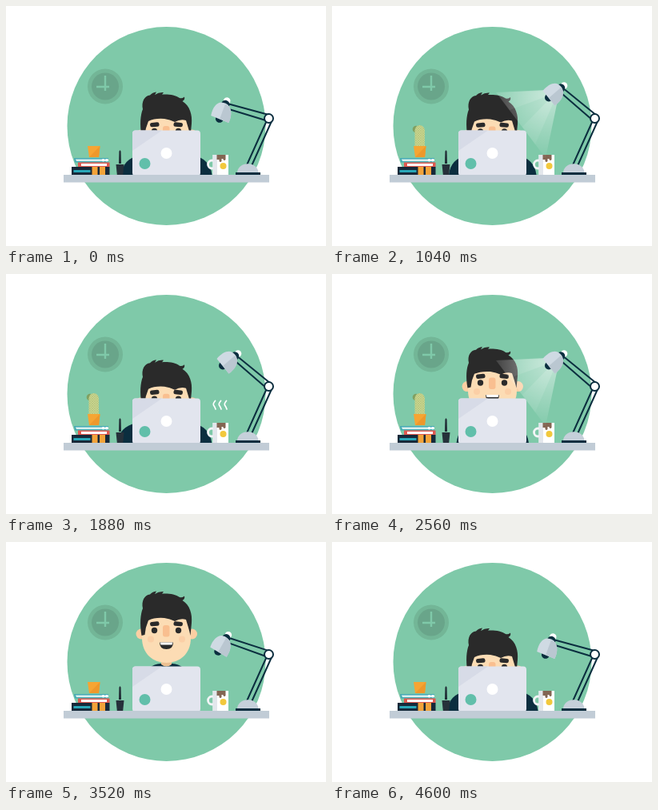
Write an HTML page that moves like this. It is 400 px wide and 300 px high and loops after 4640 ms.

```html
<!DOCTYPE html>
<html lang="en">
<head>
<meta charset="utf-8">
<title>Desk</title>
<style>
html, body { margin: 0; width: 100%; height: 100%; overflow: hidden; background: #fff; }
svg { display: block; width: 100vw; height: 100vh; }
.ink { fill: #0b2e3f; }
.hair { fill: #2a2a2a; }
.line { fill: none; stroke: #0b2e3f; stroke-width: 2; }
</style>
</head>
<body>
<svg viewBox="0 0 400 300">
  <defs>
    <radialGradient id="glow" gradientUnits="userSpaceOnUse" cx="274" cy="112" r="78">
      <stop offset="0" stop-color="#fff" stop-opacity=".5"/>
      <stop offset="1" stop-color="#fff" stop-opacity=".03"/>
    </radialGradient>
    <pattern id="spikes" width="3" height="3" patternUnits="userSpaceOnUse">
      <rect width="3" height="3" fill="#c9d58f"/>
      <path d="M0 0L3 3M3 0L0 3" stroke="#adbd74" stroke-width=".5"/>
    </pattern>
    <clipPath id="abovePot"><path d="M90 120h40v56h-40z"/></clipPath>
    <clipPath id="aboveDesk"><path d="M0 0h400v211h-400z"/></clipPath>
  </defs>

  <circle cx="200.5" cy="150" r="124" fill="#7fc9a9"/>
  <circle cx="124" cy="100.5" r="22" fill="#73b697"/>
  <circle cx="124" cy="100.5" r="17" fill="#69a58a"/>
  <path d="M124 87v19M113 101h16" stroke="#7fc9a9" stroke-width="2.4"/>

  <g clip-path="url(#abovePot)">
    <g id="cactus">
      <circle cx="105" cy="154" r="4.3" fill="#80a061"/>
      <path d="M103.5 177V155.500a6.200 6.500 0 0 1 12.400 0V177z" fill="url(#spikes)"/>
    </g>
  </g>
  <path d="M102 175h15.500l-1.500 14h-12z" fill="#f6a533"/>
  <path d="M117.500 175l-1.500 14h-12z" fill="#ee982b"/>
  <path d="M85 190h43v2h-41l2 2h39v1.500h-42z" fill="#45aab5"/>
  <path d="M87 191.500h41v2.500h-40z" fill="#d9f0ee"/>
  <circle cx="121.500" cy="192.700" r="1.800" fill="#fff"/>
  <circle cx="126" cy="192.700" r="1.800" fill="#fff"/>
  <path d="M90 195.500h39.500v5.700h-39.500z" fill="#df5950"/>
  <path d="M94 197h32v3h-32z" fill="#fff"/>
  <path d="M82 201h47.500v10h-47.500z" fill="#17293a"/>
  <path d="M84.500 205h21v3h-21z" fill="#28a7b8"/>
  <path d="M107.500 201h7v10h-7zM117 201h7v10h-7z" fill="#f2a33a"/>

  <g class="ink" clip-path="url(#aboveDesk)">
    <path id="leftArm" d="M144 211Q146 191 168 186V211z"/>
    <path id="rightArm" d="M257.500 211Q255 191 233 186V211z"/>
    <path id="shirt" d="M170 170Q178 153 193 152h15Q223 153 231 170z"/>
  </g>

  <g id="head">
    <path d="M194 144h13v9q-6.500 5-13 0z" fill="#ecc091"/>
    <circle cx="169" cy="115" r="6.500" fill="#fbcfa3"/>
    <circle cx="232.500" cy="115" r="6.500" fill="#fbcfa3"/>
    <path d="M170 88h61v32c0 20-14 31-30.500 31S170 140 170 120z" fill="#fcdcb4"/>
    <circle cx="181" cy="121.500" r="4" fill="#fbcfa6"/>
    <circle cx="220" cy="121.500" r="4" fill="#fbcfa6"/>
    <rect x="196" y="104" width="8.500" height="14.500" rx="3" fill="#f9bf90"/>
    <g class="hair">
      <rect x="180" y="99.500" width="11.500" height="5.500" rx="2.500" transform="rotate(-6 186 102)"/>
      <rect x="209.500" y="99.500" width="11.500" height="5.500" rx="2.500" transform="rotate(6 215 102)"/>
      <circle cx="185.500" cy="110.500" r="3.700"/>
      <circle cx="215.500" cy="110.500" r="3.700"/>
      <path d="M192 125.500h17q0 8.500-8.500 8.500t-8.500-8.500z"/>
    </g>
    <path d="M192.500 125.500h16l-1 3h-14z" fill="#fff"/>
    <path id="hair" class="hair" d="M169.500 117C167 102 168 90 171 83C169 74 173 66 180 65.500Q183 62 188 61.500L186 65Q191 61.500 197 62L195 64.500C203 64 212 65 217 69Q221 70 223 67.500Q224 71 220.500 73C230 79 233 90 232 101L230.500 117C229 109 227 104 225 97Q218 95 211 99Q205 96 198 95Q186 94 178 98Q174 107 173.500 116z"/>
  </g>

  <rect x="158" y="155.500" width="85" height="57" rx="4" fill="#e2e5ee"/>
  <path d="M162 155.500h33L158 181v-21.500q0-4 4-4z" fill="#d7dbe7"/>
  <circle cx="200.500" cy="184" r="7" fill="#fff"/>
  <circle cx="173.500" cy="197" r="7" fill="#61bfaa"/>

  <path d="M141 197l.4-15q1.100-3.500 2.200 0l.4 15z" fill="#202c35"/>
  <path d="M137.500 198h10l-1.300 13h-7.400z" fill="#26313a"/>

  <circle cx="257.500" cy="198" r="5" fill="none" stroke="#f3f5f7" stroke-width="2.800"/>
  <path d="M258.500 186h19.500v25h-19.500z" fill="#fff"/>
  <path d="M258.500 186h5.500v25h-5.500z" fill="#e3e7ec"/>
  <path d="M263.500 186h11v6q-1.500 2-3 0v-1h-2v3q-1.500 2-3 0v-2h-3z" fill="#836653"/>
  <circle cx="271.500" cy="200" r="4" fill="#f2c83c"/>
  <path id="steam" fill="none" stroke="#fff" stroke-width="1.700" stroke-linecap="round" pathLength="3" d="M262 169q-1-3-2.500-5q-1-2 2-5.500M269 169q-1-3-2.500-5q-1-2 2-5.500M276 169q-1-3-2.500-5q-1-2 2-5.500"/>

  <g id="light" fill="url(#glow)">
    <path d="M266 105L205 108L267 190L282 118z"/>
    <path d="M267 106L205 108L222 130L271 112zM273 115L238 151L254 173L278 118z" opacity=".4"/>
  </g>

  <path class="line" d="M300 201L326.500 142M305.500 203L332 144"/>
  <path d="M289 208.500a13 11 0 0 1 26.500 0z" fill="#c6d0da"/>
  <path class="ink" d="M287 208h31v3h-31z"/>
  <g id="arm">
    <path class="line" d="M288 102L331 137M284.500 107L326 143"/>
    <g id="shade">
      <circle cx="290" cy="99.500" r="4.300" fill="#fff"/>
      <circle class="ink" cx="286" cy="102.500" r="5.300"/>
      <circle class="ink" cx="271" cy="114.500" r="5"/>
      <path d="M263.500 106C270 98 278 95 283 98Q288 101 289 107C289 114 285 120 278.500 124.500z" fill="#cfdae3"/>
      <path d="M271 115L286 102Q289 105 289 108C289 114 285 120 278.500 124.500z" fill="#bac7d1"/>
    </g>
  </g>
  <circle class="line" cx="328.500" cy="140.500" r="5.500" style="fill:#fff"/>
  <path d="M72 211h257v9.500H72z" fill="#c1ccd6"/>
</svg>
<script>
const LOOP = 4640;
const parts = {};
document.querySelectorAll('svg [id]').forEach(el => parts[el.id] = el);

// Eased value through [time, value] pairs.
function key(t, ...points) {
  let [t0, v0] = points[0];
  for (const [t1, v1] of points) {
    if (t < t1) {
      const k = (t - t0) / (t1 - t0 || 1);
      return v0 + (v1 - v0) * (1 - Math.cos(Math.PI * Math.max(0, k))) / 2;
    }
    [t0, v0] = [t1, v1];
  }
  return v0;
}

const place = (name, transform) => parts[name].setAttribute('transform', transform);
const scaleAt = (x, y, sx, sy) => `translate(${x} ${y}) scale(${sx} ${sy}) translate(${-x} ${-y})`;

function draw(t) {
  const swing = key(t, [0, -24], [60, -24], [400, 10], [480, 9], [680, -3], [860, 0], [3200, 0],
    [3360, 9], [3540, -22], [3680, -27], [3860, -22], [4060, -25], [4300, -24]);
  const tilt = key(t, [0, -5], [400, 3], [800, 0], [3300, 0], [3540, 1], [3700, -8], [4000, -5]);
  place('arm', `rotate(${swing} 328.5 140.5)`);
  place('shade', `rotate(${tilt} 286 103)`);

  const cactus = key(t, [60, 0], [400, 1.1], [460, 1.1], [620, .97], [760, 1],
    [3160, 1], [3260, 1.08], [3480, 0]);
  place('cactus', scaleAt(110, 176, 1, cactus));

  const light = key(t, [780, 0], [960, 1], [1240, 1], [1440, 0], [2120, 0], [2320, 1], [2780, 1], [3040, 0]);
  place('light', scaleAt(274, 112, .35 + .65 * light, .35 + .65 * light));
  parts.light.setAttribute('opacity', Math.min(1, light * 1.3));

  const down = key(t, [2360, 1], [2440, 1.05], [2700, -.06], [2860, 0],
    [4000, 0], [4100, -.07], [4340, 1.06], [4480, .98], [4600, 1]);
  const typing = key(t, [0, 0], [120, 1], [2200, 1], [2360, 0]);
  const beat = Math.sin(t * Math.PI / 160);
  place('head', `translate(0 ${46 * down + typing * .5 * beat})`);
  place('shirt', `translate(0 ${30 * Math.max(0, down)})`);
  place('hair', scaleAt(200, 117, 1, key(t, [2360, 1], [2560, .93], [2800, 1.07], [2920, 1.06],
    [3080, .98], [3240, 1], [4040, 1], [4200, 1.07], [4400, .95], [4580, 1])));
  const tuck = 26 * (1 - down);
  place('leftArm', `translate(${tuck + typing * (-2 + 4 * beat)} 0)`);
  place('rightArm', `translate(${-tuck - typing * 2 * (1 + beat) / 2} 0)`);

  const rise = key(t, [1640, 0], [1820, 1]);
  const gone = key(t, [2020, 0], [2240, 1]);
  const span = Math.max(0, rise - gone);
  parts.steam.setAttribute('stroke-dasharray', `0 ${gone} ${span} ${1 - gone - span}`);
  parts.steam.setAttribute('opacity', span > .01 ? 1 : 0);
}

const start = performance.now();
function frame() {
  draw((performance.now() - start) % LOOP);
  requestAnimationFrame(frame);
}
frame();
</script>
</body>
</html>
```
